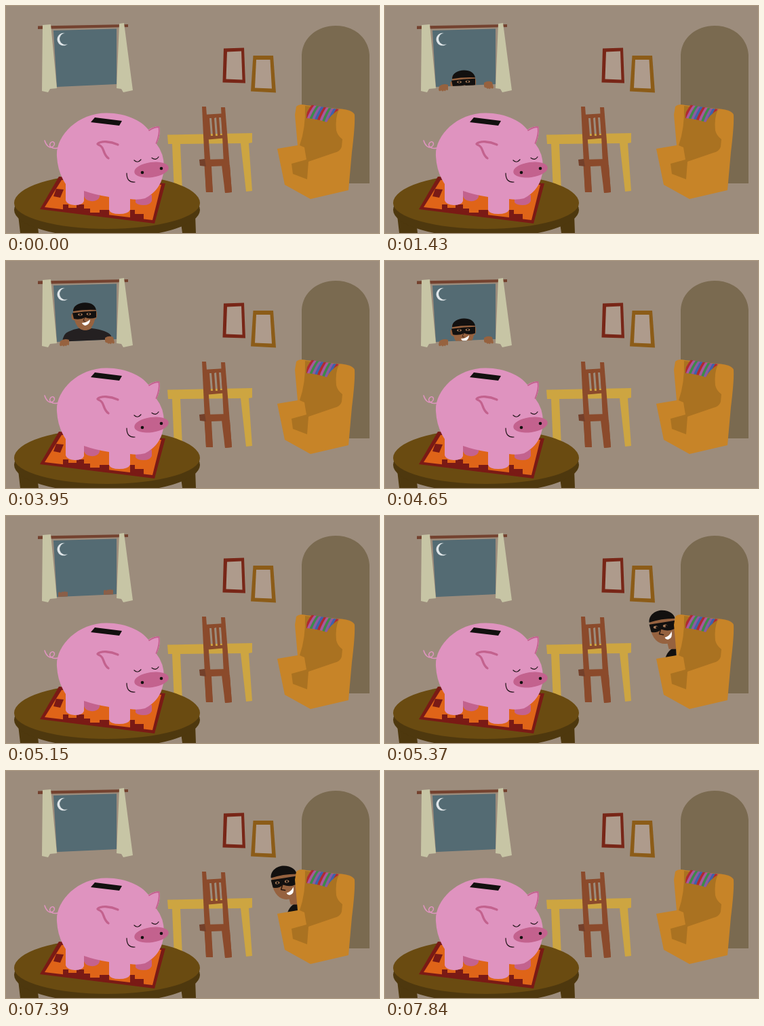
These frames come from a looping animation (550x334 px, 8 s). An HTML page:

```html
<!DOCTYPE html>
<html lang="en">
<head>
<meta charset="utf-8">
<title>Piggy bank at night</title>
<style>
  html, body { margin: 0; width: 100%; height: 100%; overflow: hidden; background: #9c8c7c; }
  svg { display: block; width: 100%; height: 100%; }
  .line { fill: none; stroke-linecap: round; stroke-linejoin: round; }
  .skin { fill: #96623f; }
  .black { fill: #12100f; }
</style>
</head>
<body>
<svg viewBox="0 0 550 334">
  <defs>
    <clipPath id="glass"><path d="M70 36L163 33.500V115L75 119Z"/></clipPath>
    <clipPath id="blanket"><path d="M448 145Q468 149 492 152Q478 160 473 171Q458 166 443 165Q443 154 448 145Z"/></clipPath>
  </defs>
  <rect width="550" height="334" fill="#9c8c7c"/>

  <!-- window -->
  <path fill="#546b73" d="M70 36L163 33.500V115L75 119Z"/>
  <path fill="#dfe5e8" d="M87 40A9.300 9.300 0 1 0 91 56A8.400 8.400 0 1 1 87 40Z"/>
  <g clip-path="url(#glass)">
    <g id="peeper">
      <path fill="#242021" d="M83 120Q84 107 92 104Q100 100 108 99H126Q150 102 155 110V120Z"/>
      <path class="skin" d="M109 92H126V99Q118 105 109 99Z"/>
      <path class="skin" d="M99 70V77Q95 77 97 85Q99 88 101 87Q105 101 116 102Q128 101 131 86Q135 84 134 76L132 70Z"/>
      <path class="black" d="M99 74Q99 64 113 61.500Q130 60 133 72Q116 71 99 74Z"/>
      <path class="black" d="M98 76.500Q116 74 133 73.500L133 83Q124 86 117 83Q109 87 100 85Z"/>
      <g fill="#a87a58"><ellipse cx="109.500" cy="78.700" rx="3.300" ry="1.700"/><ellipse cx="122" cy="78" rx="3.300" ry="1.700"/></g>
      <g id="peeperEyes" class="black"><circle cx="109.500" cy="78.700" r="1.400"/><circle cx="122" cy="78" r="1.400"/></g>
      <path class="line" stroke="#3a2218" d="M116 83L114 88L117 89"/>
      <path fill="#fff" d="M112 91Q119 91 124 86Q124 93 117 95Q113 94 112 91Z"/>
    </g>
    <g id="tips" fill="#8a5f48">
      <path d="M77 121V113Q79 110 81 113Q83 110 85 112Q87 109 88 112Q91 110 91 113V121Z"/>
      <path d="M144 118V110Q146 107 148 110Q150 107 152 109Q154 106 155 109Q158 107 158 110V118Z"/>
    </g>
  </g>
  <path fill="#74422f" d="M47 29.500L180 27V31L47 34Z"/>
  <g fill="#c7c5a5">
    <path d="M54 28L66 27L75 121L65 122L62 127L53 125Z"/>
    <path d="M167 26L174 25L187 124L173 127L170 122L163 121Z"/>
  </g>
  <g id="hands" class="skin">
    <path d="M80 118Q86 113 93 116L93 123Q92 125 90 123Q89 127 87 124Q85 127 83 124Q80 127 79 123Z"/>
    <path d="M146 113Q152 109 158 112L160 120Q158 123 156 120Q155 124 153 121Q151 123 149 120Q147 121 146 118Z"/>
  </g>

  <!-- pictures and doorway -->
  <path fill="#782617" d="M321 62.500L351 61.500L353 113.500L319.500 112.500Z"/>
  <path fill="#ae9b8c" d="M326 67.500L347 66.500L348.500 108.500L324.500 107.500Z"/>
  <path fill="#8c5c18" d="M364.500 73L394 73L398 127.500L361 125.500Z"/>
  <path fill="#ae9b8c" d="M369 79L389.500 79L392 121.500L367 120.500Z"/>
  <path fill="#7a6a50" d="M436 261V72C437 46 460 29 486 29C515 29 535 48 536 73V261Z"/>

  <!-- dining table and chair -->
  <path fill="#cda541" d="M238 189.500L363 187V201L358 202L363 272L354 273L346 202L257 203L260 272H248L245 203L239 203Z"/>
  <g fill="#8b4a2b">
    <path d="M289 148H295L305 274H295Z"/>
    <path d="M317 149H323L333 274L323 275Z"/>
    <path fill-rule="evenodd" d="M290 160L323 158L326 194L293 197ZM300 165L302 191H305L303 165ZM307 165L309 191H312L310 164ZM314 164L316 190H319L317 164Z"/>
    <path d="M292 226L328 225V235L303 236L305 274H295Z"/>
    <path d="M318 234H330L333 274L323 275Z"/>
  </g>
  <path fill="#74402a" d="M285 226L293 225L295 236L286 235Z"/>

  <!-- robber behind the armchair -->
  <g id="lurker">
    <path class="black" d="M413 212Q417 196 430 193V212Z"/>
    <path class="skin" d="M391 153L427 148L430 196H419L417 188Q407 190 400 183Q393 176 391 162Z"/>
    <path class="black" d="M390 157C389 146 399 139 409 139C420 139 427 145 428 151Q407 151 390 157Z"/>
    <path class="black" d="M390 160L428 154V166Q418 171 408 167Q401 173 393 171Z"/>
    <g fill="#a87a58"><ellipse cx="399.500" cy="164" rx="3.300" ry="2" transform="rotate(-8 399.500 164)"/><ellipse cx="413.500" cy="162" rx="3.300" ry="2" transform="rotate(-8 413.500 162)"/></g>
    <g id="lurkerEyes" class="black"><circle cx="399.500" cy="164" r="1.500"/><circle cx="413.500" cy="162" r="1.500"/></g>
    <path class="line" stroke="#24150f" stroke-width="1.500" d="M407 167L405 174L411 175"/>
    <path fill="#fff" d="M413 179Q420 177 423 170Q425 180 418 182Q414 182 413 179Z"/>
  </g>

  <!-- armchair -->
  <path fill="#c78428" d="M428 148Q433 143 443 146L488 151Q511 152 514 160Q515 175 510 215L505 271L449 284L411 263L400 210L430 205L426 160Z"/>
  <path fill="#aa7221" d="M441 147L491 152Q485 165 487 183Q489 191 496 196L495 207Q493 214 484 216L446 229L444 255L423 247L421 232L443 226L440 208L433 205Q442 180 441 147Z"/>
  <g id="stripes" class="line" clip-path="url(#blanket)" stroke-width="4.400"></g>

  <!-- round table and mat -->
  <path fill="#4e380e" d="M18 308H45L48 334H21ZM257 312L279 306L280 334H260Z"/>
  <ellipse cx="149" cy="300" rx="137" ry="41" fill="#4e380e"/>
  <path fill="#6a4b11" d="M12 290A137 43 0 0 1 286 290A137 38 0 0 1 12 290Z"/>
  <path fill="#7a1a15" d="M78 251L235 261L219 320L50 299Z"/>
  <path fill="#df6418" d="M82 256L229 263L216 315L57 296Z"/>
  <g fill="#7a1a15">
    <path d="M74 269L85 270L80 282L70 280Z"/>
    <path d="M84 301V292H92V297H104V292H115V298H124V304H138V300H152V311Z"/>
    <path d="M183 312V300H190V306H203V314Z"/>
  </g>

  <!-- pig -->
  <g fill="#c3628e">
    <path d="M115 268H138V281Q135 288 125 287Q117 286 115 280Z"/>
    <path d="M191 280L215 278V287Q212 293 203 293Q194 293 191 289Z"/>
  </g>
  <path class="line" stroke="#df93bf" stroke-width="1.500" d="M76 209C68 211 62 206 66 201C70 197 74 203 69 207C64 210 59 205 57 198"/>
  <path fill="#df93bf" d="M75 221C73 192 105 157 149 157.500C177 158 199 168 210 182Q217 177 226 177Q229 188 222 203Q233 217 233 237Q232 269 205 283Q194 286 183 284V300Q180 306 167 306Q154 306 152 300V281Q132 278 115 272V287Q113 293 101 293Q90 292 88 286V262Q76 244 75 221Z"/>
  <path class="line" stroke="#c3628e" stroke-width="1.800" d="M211 183Q218 178 225.500 178Q227 189 221.500 202"/>
  <path class="black" d="M131 164L171 169L167 176L125 171Z"/>
  <path class="line" stroke="#c3628e" stroke-width="3.300" d="M135 203C140 198 154 199 165 204M136 204C146 207 142 218 151 224"/>
  <ellipse cx="214.500" cy="241" rx="25.500" ry="11" transform="rotate(-8 214.500 241)" fill="#c3628e"/>
  <circle class="black" cx="201" cy="245" r="2.300"/>
  <circle class="black" cx="229" cy="239" r="2.300"/>
  <path class="line" stroke="#201418" stroke-width="1.200" d="M189 227Q194 232 199 226M215 223.500Q221 228 225 222M178 246Q178 260 190 259"/>
</svg>
<script>
  const LOOP = 8000;
  const part = id => document.getElementById(id);
  const move = (id, x, y) => part(id).setAttribute('transform', `translate(${x} ${y})`);
  const show = (id, on) => part(id).setAttribute('visibility', on ? 'visible' : 'hidden');

  const yarns = ['#b02a30', '#a8589c', '#3d8a4a', '#8b5aa0', '#3f62a8'];
  part('stripes').innerHTML = Array.from({ length: 16 }, (_, i) => {
    const x = 438 + i * 4;
    return `<path stroke="${yarns[i % 5]}" d="M${x + 20} 141Q${x + 8} 152 ${x} 176"/>`;
  }).join('');

  // Fraction done of a move in `count` hard steps: first, second, then one per gap.
  function progress(t, first, second, gap, count) {
    if (t < first) return 0;
    if (t < second) return 1 / count;
    return Math.min(1, (2 + Math.floor((t - second) / gap)) / count);
  }

  function draw(t) {
    const up = progress(t, 1300, 1350, 80, 7);
    const down = progress(t, 4550, 4650, 100, 5);
    move('peeper', 0, 58 * (1 - up + down));
    move('peeperEyes', t < 2750 ? 0 : t < 3350 ? -1.8 : t < 3950 ? 1.8 : 0, 0);

    const leaving = t >= 5150;
    show('hands', t >= 900 && !leaving);
    show('tips', t >= 500 && t < 900 || leaving && t < 5250);
    move('tips', leaving ? 0 : 4.5, leaving ? 0 : t < 700 ? 1 : -2);

    const out = progress(t, 5270, 5290, 20, 7);
    const back = progress(t, 7390, 7440, 100, 6);
    const hidden = 1 - out + back;
    show('lurker', hidden < 1);
    move('lurker', -7 + 46 * hidden, -5.5 + 36 * hidden);
    move('lurkerEyes', t < 5890 ? 1.8 : t < 6390 ? -1.8 : 0, 0);
  }

  function tick() {
    draw(performance.now() % LOOP);
    requestAnimationFrame(tick);
  }
  tick();
</script>
</body>
</html>
```
